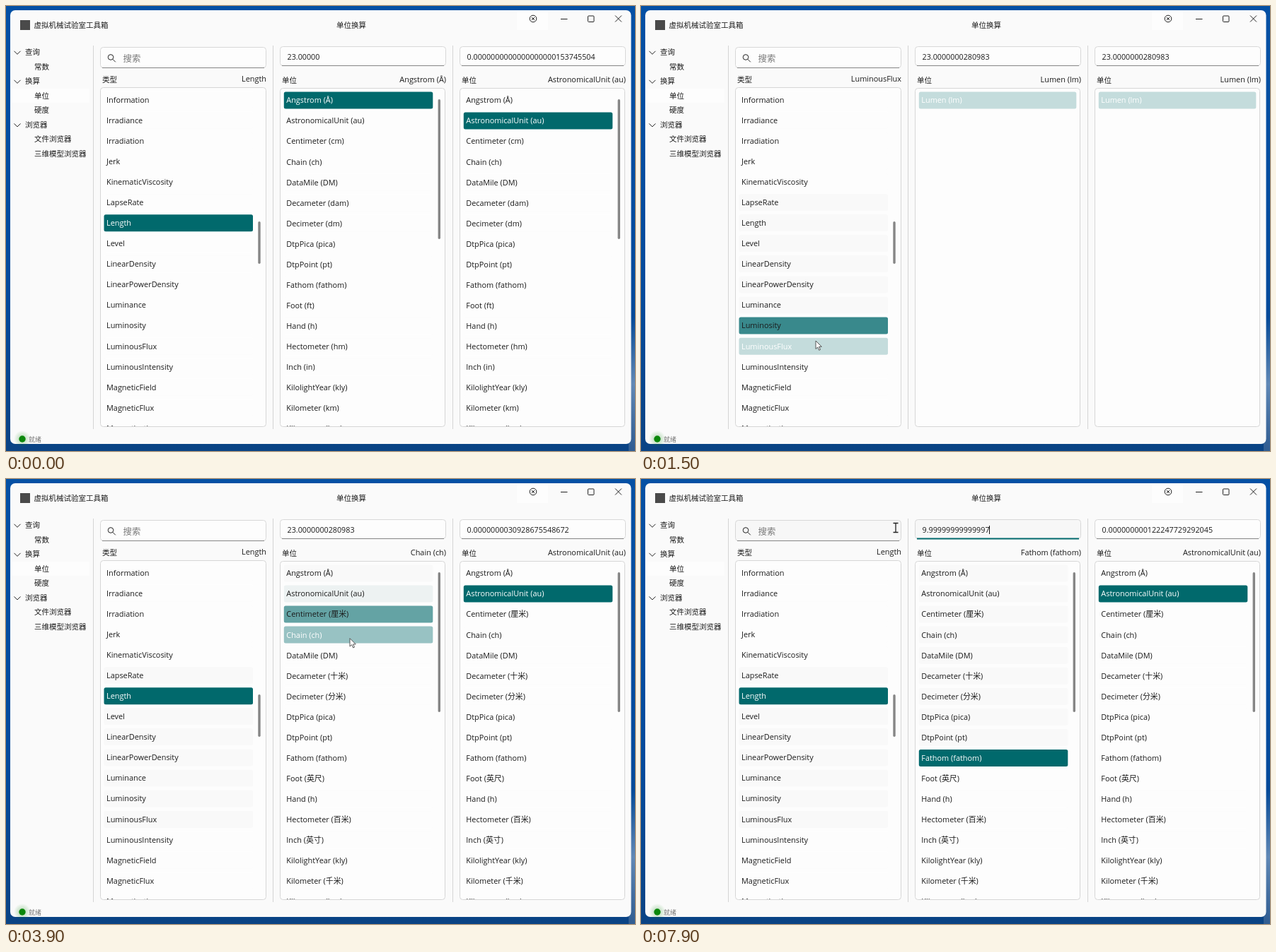
An HTML page that plays this animation: 889 by 630 pixels, repeating every 8000 ms.

```html
<!DOCTYPE html>
<html lang="zh">
<head>
<meta charset="utf-8">
<title>单位换算</title>
<style>
html, body { margin: 0; width: 100%; height: 100%; overflow: hidden; }
svg { display: block; width: 889px; height: 630px; }
text { font: 10.9px "Open Sans", "Noto Sans CJK SC", sans-serif; fill: #1b1b1b; white-space: pre; }
.zh { font-size: 10.5px; }
.num { font-size: 10.75px; }
.end { text-anchor: end; }
.line { fill: none; stroke: #222; }
.box { fill: #fdfdfd; stroke: #d6d6d6; }
.rule { stroke: #d4d4d4; }
.thumb { fill: #868686; }
</style>
</head>
<body>
<svg id="stage" viewBox="0 0 889 630">
  <defs>
    <linearGradient id="sky" x2="0" y2="1">
      <stop offset="0" stop-color="#0450a4"/>
      <stop offset=".65" stop-color="#024a9c"/>
      <stop offset="1" stop-color="#0a4384"/>
    </linearGradient>
    <linearGradient id="cloud" x2="0" y2="1">
      <stop offset="0" stop-color="#7f9fc4" stop-opacity="0"/>
      <stop offset=".5" stop-color="#7f9fc4" stop-opacity=".75"/>
      <stop offset="1" stop-color="#57779f" stop-opacity=".5"/>
    </linearGradient>
    <radialGradient id="halo">
      <stop offset=".4" stop-color="#0a870a" stop-opacity=".2"/>
      <stop offset="1" stop-color="#0a870a" stop-opacity="0"/>
    </radialGradient>
    <clipPath id="view"><path d="M134 116h741v479h-741z"/></clipPath>
    <clipPath id="marked"><rect id="markClip" y="65" height="14"/></clipPath>
  </defs>
  <rect width="889" height="630" fill="url(#sky)"/>
  <rect x="880" y="440" width="9" height="190" fill="url(#cloud)"/>
  <rect x="6" y="6" width="877.5" height="614" rx="7" fill="#fafafa"/>
  <path d="M722 7h44v27h-44zM8 117h110v20h-110z" fill="#fdfdfd"/>
  <rect x="20" y="20" width="14" height="14" fill="#4a4a4a"/>
  <text class="zh" x="39.5" y="31">虚拟机械试验室工具箱</text>
  <text class="zh" x="467" y="31">单位换算</text>
  <g class="line">
    <circle cx="745" cy="18" r="4.8"/>
    <path d="M743 16l4 4m0-4l-4 4M784 18.5h9.500M861 13.500l9 9m0-9l-9 9"/>
    <rect x="822.5" y="14" width="8.5" height="8.5" rx="1"/>
  </g>
  <g id="nav"></g>
  <path class="rule" d="M123.500 56v543M377.500 56v543M631.500 56v543"/>
  <circle cx="23" cy="613" r="12" fill="url(#halo)"/>
  <circle cx="23" cy="613" r="4.7" fill="#0a870a"/>
  <text x="32" y="616.500" style="font-size:9px;fill:#777">就绪</text>
  <g id="fields"></g>
  <g class="line"><circle cx="148" cy="72.500" r="3.800"/><path d="M150.800 75.300l4 4"/></g>
  <text x="165.500" y="78.600" style="font-size:12.4px;fill:#777">搜索</text>
  <text class="zh" x="136" y="108">类型</text>
  <text class="zh" x="390" y="108.800">单位</text>
  <text class="zh" x="644" y="108.800">单位</text>
  <g id="heads"></g>
  <g id="values"></g>
  <rect id="mark" y="65" height="14" fill="#01696c"/>
  <text id="markText" class="num" x="397.500" y="76" clip-path="url(#marked)" style="fill:#fff"></text>
  <rect id="caret" y="66" width="1" height="12" fill="#111"/>
  <path class="box" d="M137.500 115.500h226a4 4 0 0 1 4 4v472a4 4 0 0 1-4 4h-226a4 4 0 0 1-4-4v-472a4 4 0 0 1 4-4z"/>
  <rect class="box" x="387.500" y="116.500" width="233" height="479" rx="4"/>
  <rect class="box" x="641.500" y="116.500" width="233" height="479" rx="4"/>
  <g id="lists" clip-path="url(#view)"></g>
  <path id="arrow" d="M0 0v11.500l2.700-2.500 1.900 4.300 1.900-.8-1.900-4.200h3.700z" fill="#fff" stroke="#444" stroke-width=".9"/>
  <path id="beam" class="line" d="M-3.500-6.500h7M0-6.500v13M-3.500 6.500h7" stroke-width="1.300"/>
</svg>
<script>
const LOOP = 8000, STEP = 100, FADE = 200, PITCH = 29.07;
const TEAL = [1, 105, 108], PAPER = [253, 253, 253], TOUCHED = [249, 249, 249];
const $ = id => document.getElementById(id);

function add(parent, tag, attrs, text = '') {
  const el = document.createElementNS('http://www.w3.org/2000/svg', tag);
  for (const k in attrs) el.setAttribute(k, attrs[k]);
  el.textContent = text;
  return parent.appendChild(el);
}
function set(el, attrs) {
  for (const k in attrs) el.setAttribute(k, attrs[k]);
}
const show = (el, on) => { el.style.display = on ? '' : 'none'; };

const types = ('Information Irradiance Irradiation Jerk KinematicViscosity LapseRate Length Level ' +
  'LinearDensity LinearPowerDensity Luminance Luminosity LuminousFlux LuminousIntensity ' +
  'MagneticField MagneticFlux Magnetization').split(' ');
const LENGTH = 6;

const metric = 'Centimeter:cm Foot:ft Inch:in Meter:m Millimeter:mm';
const cross = (heads, tails) => heads.split(' ').flatMap(h => tails.split(' ').map(p => {
  const [name, sign] = h.split(':'), [per, unit] = p.split(':');
  return `${name}Per${per} (${sign}/${unit})`;
}));
const plain = s => s.split(' ').map(p => p.replace(/(.*):(.*)/, '$1 ($2)'));

const lengths = plain('Angstrom:Å AstronomicalUnit:au Centimeter:cm Chain:ch DataMile:DM Decameter:dam ' +
  'Decimeter:dm DtpPica:pica DtpPoint:pt Fathom:fathom Foot:ft Hand:h Hectometer:hm Inch:in ' +
  'KilolightYear:kly Kilometer:km Kiloparsec:kpc');
const local = { cm: '厘米', dam: '十米', dm: '分米', ft: '英尺', hm: '百米', in: '英寸', km: '千米' };
const localLengths = lengths.map(s => s.replace(/\((\w+)\)/, (m, u) => `(${local[u] || u})`));

// units, total count and value shown on the right for each type
const catalog = {
  LapseRate: [['DegreeCelsiusPerKilometer (∆°C/km)'], 1, '23.0000000280983'],
  Length: [localLengths, 38, '0.0000000000000000000153745504'],
  Level: [plain('Decibel:dB Neper:Np'), 2, '2.64797284523494'],
  LinearDensity: [cross('Gram:g Kilogram:kg Microgram:µg Milligram:mg', 'Centimeter:cm Foot:ft Meter:m Millimeter:mm'), 16, '701.040000856436'],
  LinearPowerDensity: [cross('Gigawatt:GW Kilowatt:kW Megawatt:MW Milliwatt:mW', metric), 25, '701.040000856436'],
  Luminance: [cross('Candela:Cd', 'SquareFoot:ft² SquareInch:in² SquareMeter:m²').concat(
    cross('Centicandela:cCd Decicandela:dCd Kilocandela:kCd Microcandela:µCd Millicandela:mCd Nanocandela:nCd', 'SquareMeter:m²'), 'Nit (nt)'), 10, '0.159722222417349'],
  Luminosity: [plain('Decawatt:daW Deciwatt:dW Femtowatt:fW Gigawatt:GW Kilowatt:kW Megawatt:MW Microwatt:µW ' +
    'Milliwatt:mW Nanowatt:nW Petawatt:PW Picowatt:pW SolarLuminosity:L⊙ Terawatt:TW Watt:W'), 14, '2300.00000280983'],
  LuminousFlux: [['Lumen (lm)'], 1, '23.0000000280983']
};

// selection histories: [time, row]
const typeLog = [[-1000, 6], [700, 5], [850, 6], [950, 7], [1050, 8], [1130, 9], [1210, 10], [1290, 11], [1455, 12],
  [1650, 11], [1730, 10], [1810, 9], [1890, 8], [1970, 7], [2050, 6]];
const unitLog = [[2050, 0], [3600, 1], [3710, 2], [3820, 3], [3930, 4], [4030, 5], [4130, 6], [4220, 7], [4290, 8], [4375, 9]];
const meters = [1e-10, 149597870700, .01, 20.1168, 1828.8, 10, .1, .004233333333, .000352777778, 1.8288];

const path = [[100, 128, 604], [350, 178, 420], [600, 206, 276], [800, 212, 292], [1000, 220, 366], [1500, 247, 474],
  [1700, 240, 440], [2050, 226, 312], [2250, 360, 215], [2500, 519, 162], [2700, 497, 206], [3000, 487, 268],
  [3200, 482, 311], [3300, 482, 311], [3500, 488, 140], [3700, 490, 172], [4200, 480, 306], [4500, 473, 409],
  [4700, 482, 572], [4900, 545, 260], [5100, 604, 72], [5300, 560, 72], [5800, 372, 70], [5900, 360, 69]];

function pointer(t) {
  const k = path.findIndex(p => p[0] >= t);
  if (k < 0) return path[path.length - 1].slice(1);
  if (k === 0) return path[0].slice(1);
  const [t0, x0, y0] = path[k - 1], [t1, x1, y1] = path[k], f = (t - t0) / (t1 - t0);
  return [x0 + (x1 - x0) * f, y0 + (y1 - y0) * f];
}

const latest = (log, t) => log.filter(e => e[0] <= t).pop();

function shade(log, row, t) {
  let a = 0, base = PAPER;
  log.forEach(([from, r], k) => {
    if (r !== row || from > t) return;
    const to = k + 1 < log.length ? log[k + 1][0] : Infinity;
    a = t < to ? Math.min(1, (t - from) / FADE) : Math.max(0, 1 - (t - to) / FADE);
    if (t >= to) base = TOUCHED;
  });
  return `rgb(${base.map((c, i) => Math.round(c + (TEAL[i] - c) * a))})`;
}

// static pieces
[['查询', 1], ['常数'], ['换算', 1], ['单位'], ['硬度'], ['浏览器', 1], ['文件浏览器'], ['三维模型浏览器']].forEach(([s, top], i) => {
  const y = 65.3 + i * 20.53;
  add($('nav'), 'text', { class: 'zh', x: top ? 27 : 40, y: y + 3.9 }, s);
  if (top) add($('nav'), 'path', { class: 'line', d: `M11.500 ${y - 1.5}l4.500 4.500 4.500-4.500` });
});

function makeField(x, y, h) {
  const box = add($('fields'), 'rect', { x: x + .5, y: y + .5, width: 234, height: h, rx: 4, stroke: '#d8d8d8' });
  const foot = add($('fields'), 'path', { d: `M${x + 3} ${y + h + .5}h229`, stroke: '#868686' });
  return { box, foot };
}
const search = makeField(133, 58, 29), input = makeField(387, 57, 27), output = makeField(641, 57, 27);
output.box.setAttribute('fill', '#fdfdfd');

const heads = [[368, 107], [622, 108], [876, 108]].map(([x, y]) => add($('heads'), 'text', { class: 'end', x, y }));
const values = [397.5, 651.5].map(x => add($('values'), 'text', { class: 'num', x, y: 76 }));

function makeList(x, mid, n) {
  const rows = Array.from({ length: n }, (_, i) => {
    const y = mid + i * PITCH;
    return {
      bar: add($('lists'), 'rect', { x, y: y - 12, width: 210.5, height: 24, rx: 2.5 }),
      label: add($('lists'), 'text', { x: x + 3.5, y: y + 3.9 })
    };
  });
  return { rows, thumb: add($('lists'), 'rect', { class: 'thumb', x: x + 217.8, y: 132, width: 3.4, height: 198, rx: 1.7 }) };
}
const lists = [makeList(138.5, 132.8, 17), makeList(392.8, 133.4, 17), makeList(646.8, 133.4, 17)];
set(lists[0].thumb, { y: 305, height: 60 });

function fill(list, names, log, t, wide) {
  const chosen = latest(log, t)[1];
  list.rows.forEach(({ bar, label }, i) => {
    show(bar, i < names.length);
    set(bar, { fill: shade(log, i, t), width: wide ? 222.5 : 210.5 });
    label.textContent = names[i] || '';
    label.style.fill = i === chosen ? '#fff' : '';
  });
}

function inputText(t) {
  if (t < 700) return '23.00000';
  if (t < 6400) return '23.0000000280983';
  if (t < 6600) return '1';
  return t < 7000 ? '10' : '9.99999999999997';
}

function outputText(t, type, unit) {
  if (t >= 7000) return '0.000000000122247729292045';
  if (type !== 'Length' || unit === 0) return catalog[type][2];
  if (unit === 9) return '0.0000000002811697777152';
  if (unit === 1) return '23.0000000280983';
  return (23.0000000280983 * meters[unit] / meters[1]).toFixed(22).replace(/0+$/, '');
}

function draw(t) {
  const [since, row] = latest(typeLog, t), type = types[row];
  const [known, count] = catalog[type];
  const names = t < 700 ? lengths : known;
  const fromLog = row === LENGTH && t >= 2050 ? unitLog : [[since, 0]];
  const toLog = [[since, Math.min(1, names.length - 1)]];
  const from = latest(fromLog, t)[1], to = toLog[0][1], wide = count < 17;

  fill(lists[0], types, typeLog, t, false);
  fill(lists[1], names, fromLog, t, wide);
  fill(lists[2], names, toLog, t, wide);
  for (const l of lists.slice(1)) {
    show(l.thumb, !wide);
    set(l.thumb, { height: 7524 / count });
  }
  [type, names[from], names[to]].forEach((s, i) => { heads[i].textContent = s; });
  values[0].textContent = inputText(t);
  values[1].textContent = outputText(t, type, from);

  const [x, y] = pointer(t), typing = t >= 5100, focus = t >= 5200;
  show($('arrow'), t >= 100 && !typing);
  show($('beam'), typing);
  set($(typing ? 'beam' : 'arrow'), { transform: `translate(${x} ${y})` });
  set(input.box, { fill: typing ? '#f7f7f7' : '#fdfdfd' });
  set(input.foot, { stroke: focus ? TEAL_CSS : '#868686', 'stroke-width': focus ? 2 : 1 });
  set(search.box, { fill: t >= 5800 ? '#f7f7f7' : '#fdfdfd' });

  const marking = focus && t < 6400 && x < 493, left = Math.max(398, x);
  show($('mark'), marking);
  show($('markText'), marking);
  if (marking) {
    for (const id of ['mark', 'markClip']) set($(id), { x: left, width: 493.5 - left });
    $('markText').textContent = inputText(t);
  }
  show($('caret'), t >= 6400 && !(t >= 7500 && t < 7900));
  set($('caret'), { x: Math.round(397.5 + values[0].getComputedTextLength() - .5) });
}
const TEAL_CSS = `rgb(${TEAL})`;

const start = performance.now();
let last = -1;
function tick(now) {
  const t = Math.floor(Math.max(0, now - start) % LOOP / STEP) * STEP;
  if (t !== last) draw(last = t);
  requestAnimationFrame(tick);
}
draw(0);
requestAnimationFrame(tick);
</script>
</body>
</html>
```
